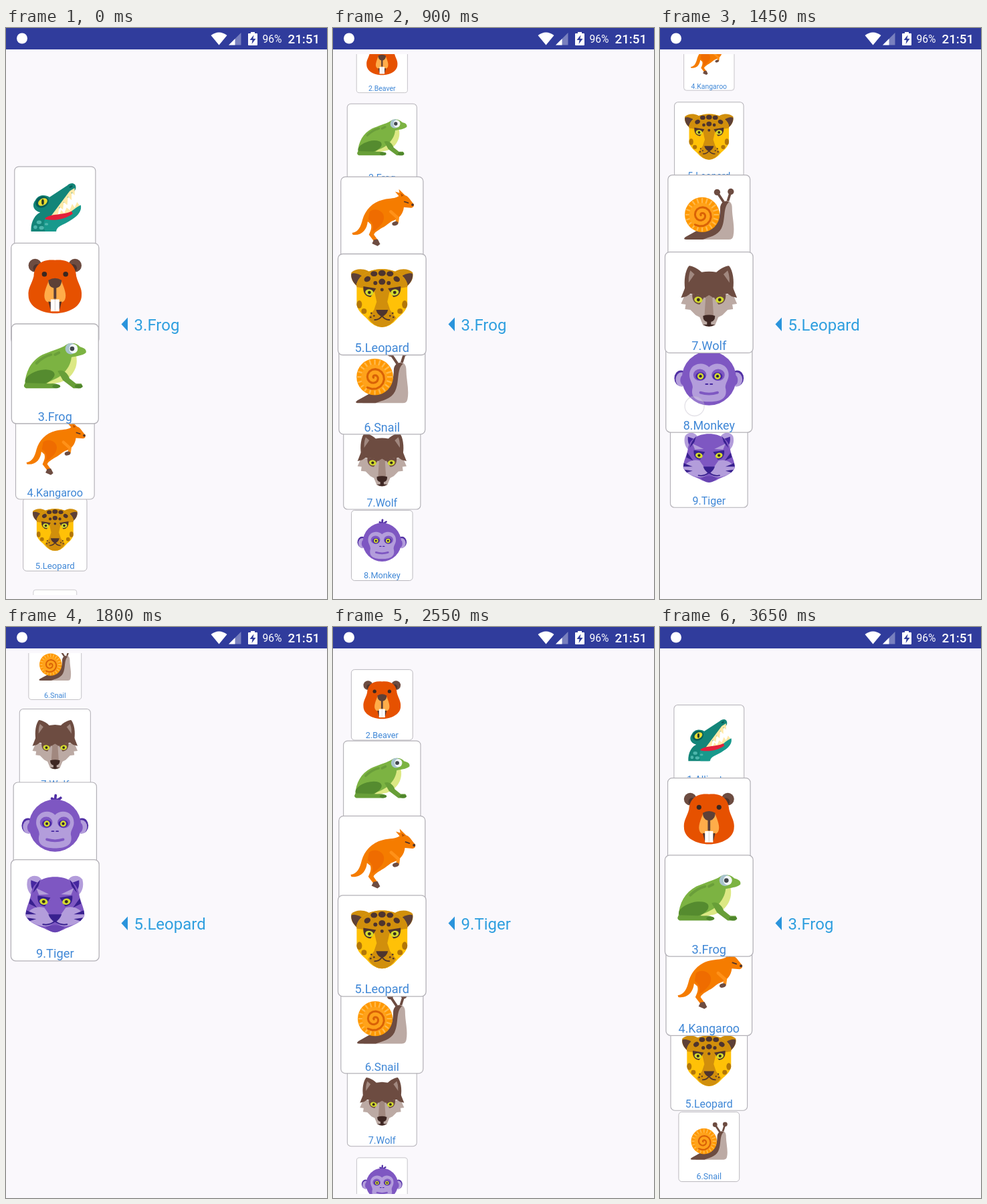
These frames come from a looping animation (480 px wide and 853 px high, 3700 ms). An HTML page:

```html
<!DOCTYPE html>
<html lang="en">
<head>
<meta charset="utf-8">
<title>Animal wheel</title>
<style>
  html, body { margin: 0; width: 100%; height: 100%; overflow: hidden; background: #faf8fc; }
  svg { display: block; width: 100%; height: 100%; }
  text { font-family: Roboto, "Liberation Sans", sans-serif; }
  .card rect.face { fill: #fff; stroke: #b3b1b7; stroke-width: 1.3; }
  .name { font-size: 18.3px; fill: #3f87d6; text-anchor: middle; }
  #label { font-size: 24px; fill: #2f9fdf; }
</style>
</head>
<body>
<svg viewBox="0 0 480 853">
  <defs><clipPath id="list"><rect x="0" y="39" width="480" height="808"/></clipPath></defs>
  <rect width="480" height="853" fill="#faf8fc"/>
  <g id="cards" clip-path="url(#list)"></g>
  <circle id="touch" r="14.5" fill="#fff" fill-opacity=".2" stroke="#b8b4c4" stroke-opacity=".4" stroke-width="1.3"/>
  <path d="M172.500 442.500L182 432.500V453Z" fill="#2a94dc"/>
  <text id="label" x="191.600" y="452">3.Frog</text>
  <rect width="480" height="32" fill="#303c9c"/>
  <circle cx="24" cy="15.500" r="8" fill="#fff"/>
  <g fill="#fff">
    <path d="M306.500 11Q318.500 2 330.500 11L318.500 25.500Z"/>
    <path d="M333 25.500H351.500V7Z" opacity=".35"/>
    <path d="M333 25.500H342.500V16Z"/>
    <path d="M366 6h6v2h3q1 0 1 1v16q0 1-1 1h-12q-1 0-1-1V9q0-1 1-1h3Z"/>
    <path d="M370.500 10.500L364.500 18H368.500L367.500 24L373.500 16H369.500Z" fill="#303c9c"/>
    <text x="383.500" y="22" font-size="15.600">96%</text>
    <text x="421.500" y="23" font-size="18.800" font-weight="500">21:51</text>
  </g>
</svg>
<script>
const LOOP = 3700, TICK = 50, MID = 444, RADIUS = 409, GAP = 120, CX = 73.3;

const p = (fill, d) => `<path fill="${fill}" d="${d}"/>`;
const o = (fill, x, y, rx, ry = rx, turn = 0) =>
  `<ellipse fill="${fill}" rx="${rx}" ry="${ry}" transform="translate(${x} ${y}) rotate(${turn})"/>`;
const line = (color, width, d) =>
  `<path fill="none" stroke="${color}" stroke-width="${width}" stroke-linecap="round" d="${d}"/>`;
const both = s => s + `<g transform="scale(-1 1)">${s}</g>`;
const catEye = (x, y, rim) =>
  p(rim, `M${x - 10} ${y - 6}L${x + 9} ${y - 9}Q${x + 10} ${y + 6} ${x - 2} ${y + 7}Z`) +
  o('#d4dc2f', x, y, 6.2, 4.6, -12) + o('#33291f', x, y, 2.4);

function spiral() {
  let d = '';
  for (let a = 0; a < 12; a += 0.4) {
    const r = 1 + a * 1.5;
    d += `${d ? 'L' : 'M'}${(-12 - r * Math.cos(a)).toFixed(1)} ${(-11 - r * Math.sin(a)).toFixed(1)}`;
  }
  return line('#d96206', 3.2, d);
}

function shellRays() {
  let s = '';
  for (let i = 0; i < 20; i++) {
    const a = i * Math.PI / 10, x = Math.cos(a), y = Math.sin(a);
    s += line('#ffb84a', 2.6, `M${-11 + 19 * x} ${-12 + 19 * y}L${-11 + 26 * x} ${-12 + 26 * y}`);
  }
  return s;
}

const animals = [
  ['Alligator',
    p('#138579', 'M-39 30C-40 14-32 2-24-1C-36-4-38-14-32-21C-28-30-16-31-9-26L20-45C26-51 34-49 34-42C34-36 29-34 25-30L-6 8L6 18L0 30Z') +
    p('#ffe9a8', 'M32-41L32-29L27-34L27-21L21-27L20-13L14-18L13-6L7-10L5 2L-6 4L24-36Z') +
    p('#ffe9a8', 'M6 6L10-5L15 0L19-9L24-5L28-15L32-9L36-18L41-11L28 4Z') +
    p('#18998c', 'M-16 9L10 7C24 2 32-9 42-13C44-4 38 4 28 10C14 20 3 20 2 30H-16C-19 22-19 15-16 9Z') +
    p('#e3203a', 'M-16 8C-4 0 12 4 27-3L29 1C16 10 0 13-16 10Z') +
    o('#075e57', -21, -18, 11, 9, -25) + o('#e9dc32', -20, -18, 8, 5.5, -30) + o('#253a28', -20, -18, 2, 4.5) +
    o('#075e57', 26, -43, 3, 1.6, -30) +
    o('#4db6ac', -26, 15, 4, 3) + o('#4db6ac', -32, 23, 3) + o('#4db6ac', -22, 24, 4, 3) + o('#4db6ac', -14, 18, 3, 2)],
  ['Beaver',
    both(o('#6d4c41', 30, -42, 10) + o('#4e342e', 27, -38, 6)) +
    p('#e65100', 'M0-50C22-52 31-41 32-26C35-14 41-8 40 3C40 20 20 30 0 30S-40 20-40 3C-41-8-35-14-32-26C-31-41-22-52 0-50Z') +
    both(o('#3a2720', 16, -29, 3.8)) +
    p('#ffad4a', 'M-9-20H9C14-8 18 2 15 9C12 16 4 13 0 9C-4 13-12 16-15 9C-18 2-14-8-9-20Z') +
    p('#4e342e', 'M-10 12Q-4 14 0 8Q4 14 10 12L7 24H-7Z') +
    p('#fff', 'M-6.500 9H6.500V27H-6.500Z') + line('#d7cfc8', 1, 'M0 10V26') +
    p('#5d4037', 'M-10-20Q0-26 10-20Q10-10 2-8V8H-2V-8Q-10-10-10-20Z')],
  ['Frog',
    p('#dce884', 'M32-28C36-12 28 6 8 13L-14 17L0-12Z') +
    p('#7cb342', 'M-46 17C-45-4-36-20-19-29C-7-34 6-38 14-42C22-49 33-47 38-41C46-39 48-36 47-32C41-27 32-27 25-25C24-16 20-8 12 0C4 8-6 10-12 14L-14 20H-44Z') +
    p('#689f38', 'M4-4C12-8 20 0 22 7L32 15H40Q43 19 39 22H28L12 10Z') +
    line('#6a9e3a', 4, 'M-28-16Q-18-26-6-29M0-29L6-32') +
    o('#558b2f', -23, 6, 23, 11, -16) +
    p('#689f38', 'M-42 14L-8 15Q4 14 5 18Q5 22 0 22H-44Q-49 20-46 15Z') +
    o('#4f862c', 2, 19, 6, 3) + o('#4f862c', 36, 19, 6, 3) +
    o('#a9c4cd', 24, -38, 8.5) + o('#f4f8fa', 28, -38, 6.5, 7) + o('#40474c', 26, -38, 3.4)],
  ['Kangaroo',
    p('#f57c00', 'M-48 14C-38 13-34 4-31-8C-27-22-16-35 1-39C12-42 20-40 27-45L21-52L28-50L27-56L37-46C42-45 44-40 51-32Q52-27 47-26L35-27C34-17 28-9 19-6C12-4 8 2 0 6C-6 10-12 13-13 17L-5 28L-11 30L-21 17C-18 10-16 6-18 0C-20-1-21-3-23-4C-24 8-32 19-47 17Z') +
    p('#ef6c00', 'M-20-20C-10-28 4-20 3-10C2 0-5 4-10 9L-16 12C-12 4-16-4-22-8Z') +
    line('#ff9118', 5, 'M14-20L25-10L24-3') +
    o('#6d4c41', 21, -1, 5, 3.2, -15) +
    p('#6d4c41', 'M-13 25L-7 24L-3 32L-7 35L-16 31Z') +
    p('#b85200', 'M30-49L35-46L31-44Z') + line('#4e342e', 1.8, 'M36-36L42-34') + o('#4e342e', 49, -31, 2)],
  ['Leopard',
    both(p('#d18f0c', 'M14-44C20-54 38-56 46-48C48-38 42-30 34-25Z') +
      p('#5d4037', 'M28-41C34-46 42-48 46-46C47-37 41-30 34-25Z')) +
    p('#ffc107', 'M0-53C18-53 34-45 38-31V0C36 12 27 16 22 22Q12 34 0 34Q-12 34-22 22C-27 16-36 12-38 0V-31C-34-45-18-53 0-53Z') +
    p('#d18f0c', 'M0-53C18-53 34-45 38-31V-26L12-22L8-4L12 8L21 20Q12 34 0 34Q-12 34-21 20L-12 8L-8-4L-12-22L-38-26V-31C-34-45-18-53 0-53Z') +
    both(catEye(19, -18, '#4e342e') + o('#4e342e', 12, -46, 5, 4) + o('#4e342e', 22, -38, 5, 4, 30) +
      o('#4e342e', 10, -32, 3) + o('#b27608', 34, 0, 4, 6) + o('#b27608', 27, 10, 4) +
      o('#4e342e', 12, 17, 1.3) + o('#4e342e', 16, 13, 1.3) + o('#4e342e', 17, 19, 1.3) + line('#4e342e', 2, 'M0 17Q4 23 11 23')) +
    o('#4e342e', 0, -47, 5.5, 4.5) + o('#4e342e', 0, -34, 5, 4.5) + o('#4e342e', 0, -22, 2.5) +
    p('#4e342e', 'M-9 8H9Q7 16 0 18Q-7 16-9 8Z')],
  ['Snail',
    line('#6d4c41', 4, 'M25-30L15-45M29-30L34-46') + o('#6d4c41', 13, -48, 5) + o('#6d4c41', 35, -49, 5) +
    p('#bcaaa4', 'M18-22C20-38 37-38 37-24C37-8 42 8 39 22Q38 28 32 28H-30L0 16C14 12 18-4 18-22Z') +
    p('#6d4c41', 'M18-22C18-32 26-36 32-32C22-24 27-4 20 10C14 22 0 24-10 28H-36Q-43 28-38 24L-20 14C8 16 18 0 18-22Z') +
    o('#ff9800', -11, -12, 28) + shellRays() + o('#ffa21a', -12, -11, 20) + spiral()],
  ['Wolf',
    both(p('#6d4c41', 'M6-38C10-48 24-55 30-55C36-48 38-32 36-20L10-20Z') + p('#a1887f', 'M18-39L28-48Q32-38 30-25Z')) +
    p('#bcaaa4', 'M-36-12H36L42 2L35 3L36 10L28 11L20 19L14 22L9 34Q0 39-9 34L-14 22L-20 19L-28 11L-36 10L-35 3L-42 2Z') +
    p('#6d4c41', 'M-22-42Q0-51 22-42L36-22L42-7L34-9L28-13L14-11L6-7L0-10L-6-7L-14-11L-28-13L-34-9L-42-7L-36-22Z') +
    p('#a1887f', 'M-5-8L0-11L5-8L7 22H-7Z') +
    both(catEye(16, -4, '#6d4c41')) +
    p('#3e2723', 'M-9 20Q0 17 9 20Q9 28 3 29V33H9Q0 39-9 33H-3V29Q-9 28-9 20Z')],
  ['Monkey',
    both(o('#5130a5', 43, -7, 10, 12) + o('#b39ddb', 42, -5, 9, 11) + o('#7e57c2', 39, -4, 5, 8)) +
    line('#5130a5', 4, 'M-5-50Q2-44 9-51M0-47L1-55') +
    o('#7e57c2', 0, -7, 41.5) +
    p('#b39ddb', 'M0-24C10-34 30-29 30-12C30-4 25 0 25 7C30 26 14 29 0 29S-30 26-25 7C-25 0-30-4-30-12C-30-29-10-34 0-24Z') +
    both(o('#7e57c2', 14, -12, 10, 9) + o('#4527a0', 13, -10, 7.5, 6) + o('#d4dc2f', 13, -10, 4.8) + o('#312044', 13, -10, 2.2) +
      line('#4527a0', 2, 'M2 2H5')) +
    line('#7e57c2', 4, 'M-13 15Q0 19 13 15')],
  ['Tiger',
    both(p('#b39ddb', 'M18-42C22-54 36-54 41-46C44-36 40-26 34-22Z') + p('#4527a0', 'M25-41L36-45Q37-34 32-28Z')) +
    p('#7e57c2', 'M0-50C20-50 34-40 36-24C38-12 44-4 44 8C40 18 26 23 16 27Q0 37-16 27C-26 23-40 18-44 8C-44-4-38-12-36-24C-34-40-20-50 0-50Z') +
    both(p('#b39ddb', 'M16-4C26-7 36-4 44 7C40 19 26 23 16 24Q4 24 0 15L9 6Z') +
      p('#b39ddb', 'M9-24L28-33L24-23Z') +
      p('#38208f', 'M22-46C27-40 31-34 33-26L25-36ZM37-18L27-4L39-10ZM43 0L28 6L44 6ZM42 11L28 13L38 16Z') +
      catEye(17, -13, '#38208f') +
      line('#38208f', 2, 'M0 16Q8 23 18 21')) +
    p('#6844b3', 'M-14 25Q0 19 14 25Q8 33 0 33Q-8 33-14 25Z') +
    p('#38208f', 'M-10 6H10Q7 14 0 18Q-7 14-10 6Z')]
];

// time, centre of the first card
const scroll = [
  [100, 276.5], [150, 258], [300, 175], [550, 45.5], [700, -22], [900, -67], [1000, -63.5], [1050, -63.5],
  [1200, -145], [1450, -310], [1600, -430], [1750, -522], [1850, -543.5], [1900, -543.5],
  [2050, -470], [2300, -287], [2450, -125], [2600, 50], [2700, 128], [2800, 163.7], [2900, 172], [3000, 176.5]
];
const labels = [[3000, 3], [1900, 9], [1000, 5], [0, 3]];
// start, end, x from, x to, y minus scroll
const drags = [[1050, 1550, 62, 49, 875], [1900, 2400, 92, 108, 802]];

const slope = (a, b) => (b[1] - a[1]) / (b[0] - a[0]);
function tangent(i) {
  if (i < 1 || i > scroll.length - 2) return 0;
  const a = slope(scroll[i - 1], scroll[i]), b = slope(scroll[i], scroll[i + 1]);
  return a * b <= 0 ? 0 : 2 * a * b / (a + b);
}
function scrollAt(t) {
  if (t <= scroll[0][0]) return scroll[0][1];
  const i = scroll.findIndex(k => k[0] >= t);
  if (i < 0) return scroll[scroll.length - 1][1];
  const [t0, a] = scroll[i - 1], [t1, b] = scroll[i], d = t1 - t0, u = (t - t0) / d, v = 1 - u;
  return a * v * v * (1 + 2 * u) + b * u * u * (3 - 2 * u) +
    d * u * v * (tangent(i - 1) * v - tangent(i) * u);
}

const $ = id => document.getElementById(id);
const box = $('cards'), touch = $('touch'), label = $('label');
const title = n => `${n}.${animals[n - 1][0]}`;
box.innerHTML = animals.map((a, i) =>
  `<g class="card"><rect class="face" x="-66" y="-75.7" width="132" height="151.4" rx="7"/>${a[1]}` +
  `<text class="name" y="71.2">${title(i + 1)}</text></g>`).join('');
const cards = [...box.children];
let last = -1;

function draw(t) {
  const top = scrollAt(t);
  const order = cards.map((el, i) => {
    const y = top + GAP * i, s = Math.cos((y - MID) / RADIUS);
    const shown = Math.abs(y - MID) < 560;
    el.style.display = shown ? '' : 'none';
    if (shown) el.setAttribute('transform', `translate(${CX} ${y}) scale(${s})`);
    return { el, z: y < 528 ? i + 1 : -i - 1 };
  });
  order.sort((a, b) => a.z - b.z).forEach(c => box.appendChild(c.el));

  label.textContent = title(labels.find(l => t >= l[0])[1]);
  const drag = drags.find(d => t >= d[0] && t < d[1]);
  touch.style.display = drag ? '' : 'none';
  if (drag) {
    const [from, to, x0, x1, dy] = drag;
    touch.setAttribute('cx', x0 + (x1 - x0) * (t - from) / (to - from));
    touch.setAttribute('cy', top + dy);
  }
}

const start = performance.now();
function frame() {
  const t = Math.floor((performance.now() - start) % LOOP / TICK) * TICK;
  if (t !== last) draw(last = t);
  requestAnimationFrame(frame);
}
frame();
</script>
</body>
</html>
```
